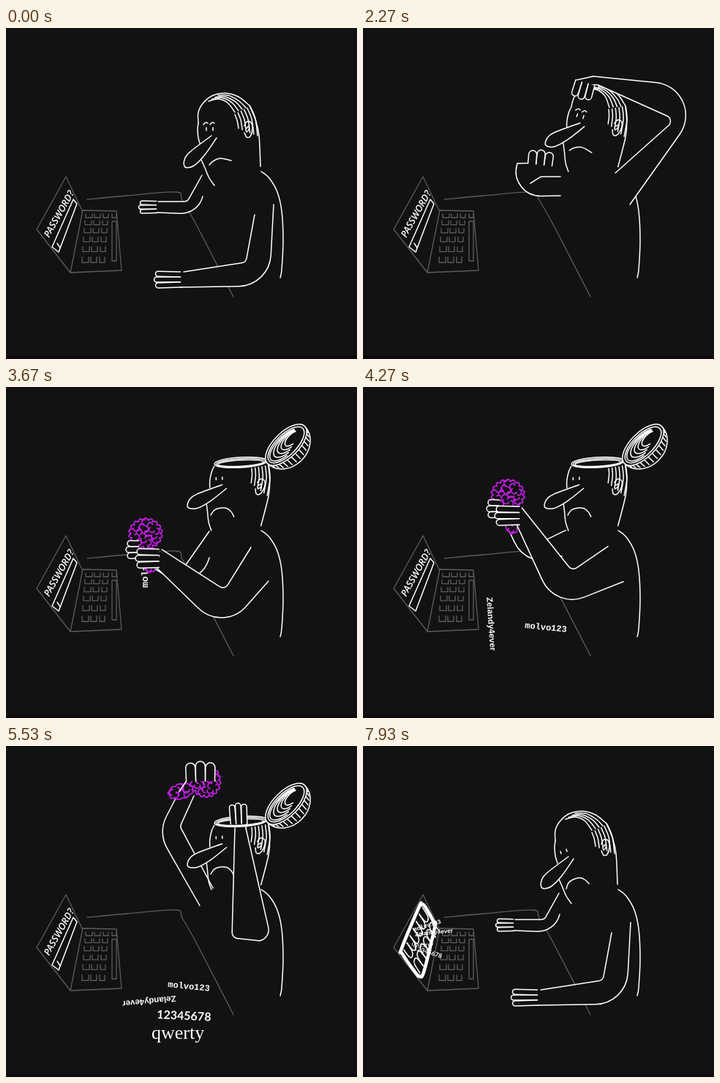
An HTML page with a canvas for the animation above (8000 ms loop, 480 px wide and 452 px high).

```html
<!DOCTYPE html>
<html lang="en">
<head>
<meta charset="utf-8">
<title>Password?</title>
<style>
  html, body { margin: 0; width: 100%; height: 100%; overflow: hidden; background: #121212; }
  canvas { display: block; }
</style>
</head>
<body>
<canvas id="stage" width="480" height="452"></canvas>
<script>
const ctx = document.getElementById('stage').getContext('2d');
const BG = '#121212', WHITE = '#fff', GREY = '#5c5c5c', PURPLE = '#c21fe3';
const LOOP = 8000, STEP = 1000 / 15, { PI, sin, cos, min, max } = Math;

const nums = s => s.match(/-?[\d.]+/g).map(Number);
const mix = (a, b, k) => a.map((v, i) => v + (b[i] - v) * k);
const linear = (t, from, to) => min(1, max(0, (t - from) / (to - from)));
const ramp = (t, from, to) => { const k = linear(t, from, to); return k * k * (3 - 2 * k); };
const noise = n => { const v = sin(n * 127.1 + 3.7) * 43758.5; return v - Math.floor(v); };

function group(paint) { ctx.save(); paint(); ctx.restore(); }

function pen(color = WHITE, width = 1.5) {
  ctx.strokeStyle = color;
  ctx.lineWidth = width;
  ctx.fillStyle = BG;
}

// Smooth curve through points given as text or a flat list.
function curve(points, fill = false) {
  const p = typeof points === 'string' ? nums(points) : points, n = p.length / 2;
  const at = i => { i = max(0, min(n - 1, i)); return [p[2 * i], p[2 * i + 1]]; };
  ctx.beginPath();
  ctx.moveTo(p[0], p[1]);
  for (let i = 0; i < n - 1; i++) {
    const [a, b, c, d] = [at(i - 1), at(i), at(i + 1), at(i + 2)];
    ctx.bezierCurveTo(b[0] + (c[0] - a[0]) / 6, b[1] + (c[1] - a[1]) / 6,
      c[0] - (d[0] - b[0]) / 6, c[1] - (d[1] - b[1]) / 6, c[0], c[1]);
  }
  if (fill) ctx.fill();
  ctx.stroke();
}

function lines(...p) {
  ctx.beginPath();
  for (let i = 0; i < p.length; i += 2) ctx.lineTo(p[i], p[i + 1]);
  ctx.stroke();
}

function ellipse(x, y, rx, ry, rot = 0, from = 0, to = 2 * PI, fill = false) {
  ctx.beginPath();
  ctx.ellipse(x, y, rx, ry, rot, from, to);
  if (fill) ctx.fill();
  ctx.stroke();
}

// Evenly spaced strands between a first and a last one.
function strands(first, last, count) {
  for (let i = 0; i < count; i++) curve(mix(nums(first), nums(last), i / (count - 1)));
}

// Arm pose: wrist, elbow, shoulder of both edges; then hand offset, angle, finger length, finger width.
const near = {
  table: '243,333 328,320 340,255  240,354 360,352 366,241  -3,0 3.14 34 7',
  scratch: '322,78 427,125 345,198  315,66 478,82 365,241  -15,3 1.85 21 9',
  low: '213,222 299,277 335,219  205,246 297,335 359,265  0,0 3.14 30 8.3',
  high: '219,143 281,241 335,217  212,165 250,290 355,266  0,-1 3.14 32 8.3',
  skull: '313,112 309,262 347,266  328,112 362,262 347,266  -2,-6 4.66 26 7.5',
  push: '158,251 230,255 326,220  155,270 260,285 338,259  0,0 3 36 7',
  sweep: '290,395 336,320 340,255  312,408 370,340 366,241  0,0 2.8 28 7'
};
const far = {
  table: '208,237 248,237 268,201  207,252 262,254 269,230  -2,0 3.14 22 5.3',
  scratch: '229,212 243,203 270,203  211,185 199,230 270,229  22,-12 4.83 18 11',
  low: '190,222 243,247 278,197  190,240 262,284 278,233  -9,-9 3.14 15 8',
  high: '203,150 226,207 277,195  197,165 212,240 270,230  -12,-13 3.14 15 8',
  skull: '257,68 238,110 283,194  237,62 208,118 265,218  19,-17 4.7 25 13',
  push: '152,243 215,251 272,210  152,252 230,258 280,236  0,0 3.1 26 5'
};

// Schedules are [time, pose]; the shaking alternates low and high.
const shake = [...Array(7)].map((_, i) => [3670 + 225 * i, i % 2 ? 'high' : 'low']);
const nearKeys = [[0, 'table'], [1470, 'table'], [1870, 'scratch'], [2950, 'scratch'], [3200, 'skull'], [3350, 'skull'],
  ...shake, [5450, 'skull'], [5700, 'skull'], [5900, 'scratch'], [6130, 'scratch'], [6400, 'sweep'],
  [6640, 'push'], [6930, 'push'], [7230, 'table'], [LOOP, 'table']];
const farKeys = [[0, 'table'], [1470, 'table'], [1800, 'scratch'], [3200, 'scratch'],
  ...shake, [5450, 'skull'], [5600, 'skull'], [6000, 'table'], [6300, 'table'],
  [6640, 'push'], [6930, 'push'], [7230, 'table'], [LOOP, 'table']];

function armAt(poses, keys, t) {
  const i = keys.findIndex(key => key[0] > t), [t0, a] = keys[i - 1], [t1, b] = keys[i];
  const v = mix(nums(poses[a]), nums(poses[b]), ramp(t, t0, t1));
  const [ox, oy, angle, length, width] = v.slice(12);
  return {
    inner: v.slice(0, 6), outer: v.slice(6, 12), ox, oy, angle, length, width,
    x: (v[0] + v[6]) / 2, y: (v[1] + v[7]) / 2
  };
}

// Two straight bones joined by a rounded elbow.
function limb([ax, ay, bx, by, cx, cy], radius, joined) {
  const [u, v] = [Math.atan2(ay - by, ax - bx), Math.atan2(cy - by, cx - bx)];
  const half = Math.acos(cos(u - v)) / 2;
  const reach = 0.95 * min(Math.hypot(ax - bx, ay - by), Math.hypot(cx - bx, cy - by));
  joined ? ctx.lineTo(ax, ay) : ctx.moveTo(ax, ay);
  ctx.arcTo(bx, by, cx, cy, min(radius, reach * Math.tan(half)));
  ctx.lineTo(cx, cy);
}

function drawArm({ inner, outer }) {
  const [ax, ay, bx, by, cx, cy] = outer;
  pen();
  ctx.beginPath(); limb(inner, 8); limb([cx, cy, bx, by, ax, ay], 45, true); ctx.fill();
  ctx.beginPath(); limb(inner, 8); limb(outer, 45); ctx.stroke();
}

// Three rounded fingers ordered from the inner to the outer edge.
function drawHand({ inner, outer, x, y, ox, oy, angle, length, width }, lift = () => 0) {
  const nx = sin(angle), ny = -cos(angle);
  const side = nx * (outer[0] - inner[0]) + ny * (outer[1] - inner[1]) < 0 ? -1 : 1;
  const r = width / 2, baseX = x + ox, baseY = y + oy, edge = 1.5 * width * side;
  pen();
  lines(outer[0], outer[1], baseX + nx * edge, baseY + ny * edge);
  for (let i = 0; i < 3; i++) group(() => {
    const across = (i - 1) * width * side, tip = length - r + (i === 1 ? 2 : 0);
    ctx.translate(baseX + nx * across, baseY + ny * across);
    ctx.rotate(angle + (1 - i) * side * 0.03 + lift(i));
    ctx.beginPath();
    ctx.moveTo(0, -r);
    ctx.arc(tip, 0, r, -PI / 2, PI / 2);
    ctx.lineTo(0, r);
    ctx.fill();
    ctx.stroke();
  });
}

function label(text, font, x, y, rot) {
  group(() => {
    ctx.translate(x, y);
    ctx.rotate(rot);
    ctx.font = font;
    ctx.fillStyle = WHITE;
    ctx.fillText(text, 0, 0);
  });
}

// Words drop out of the brain, come to rest, get swept up and are fed to the screen.
const words = [
  { text: 'molvo123', style: 'bold', family: '"Liberation Mono", monospace', born: 3670, from: 13, size: 12, rest: [221, 329, 0.1] },
  { text: 'Zelandy4ever', style: 'bold', family: '"Liberation Sans", sans-serif', born: 4120, from: 11.5, size: 11.5, rest: [232, 341, 3.04] },
  { text: 'qwerty', style: '', family: '"Liberation Serif", serif', born: 4578, from: 15, size: 26, rest: [199, 400, 0] },
  { text: '12345678', style: 'bold', family: 'Lato, sans-serif', born: 5020, from: 14, size: 16, rest: [206, 372, 0.05] }
];

function drawWords(t) {
  words.forEach(({ text, style, family, born, from, size, rest }, i) => {
    if (t < born - 70) return;
    const p = linear(t, born, born + 330), drop = p * p;
    let state = mix([194, 274, 0, from], [...rest, size], drop);
    state[0] -= 33 * sin(PI * p);
    state[2] = -PI / 2 + (rest[2] + PI / 2) * min(1, 1.5 * p);
    state = mix(state, [90, 264 + 4 * i, -0.32 + 0.05 * i, size], ramp(t, 6400, 6640));
    state = mix(state, [69, 254 + 8 * i, -0.3 + 0.2 * i, 7 + 0.1 * size], ramp(t, 6870, 7050));
    const chew = t > 7050 ? 3 * sin(t / 70 + i * 2) : 0;
    label(text, `${style} ${state[3]}px ${family}`, state[0] + chew, state[1] - chew, state[2]);
  });
}

function drawDesk() {
  pen(GREY, 1.3);
  curve('111,234 165,229 232,224 241,235 262,272 311,367');
  lines(104, 249, 82, 203, 42, 275, 88, 334, 105, 249, 151, 250, 158, 331, 88, 334);
  for (let row = 0; row < 6; row++) {
    const y = 254 + 8.5 * row + 0.65 * row * row, h = 5 + row * 0.5;
    for (let col = 0; col < (row ? 3 : 4); col++) {
      const x = 109 + col * 12 - row, w = 9 - col;
      lines(x, y, x, y + h, x + w, y + h, x + w, y);
    }
  }
  ctx.strokeRect(145, 264, 6, 54);
}

function drawPrompt(t) {
  label('PASSWORD?', 'italic 600 13px "Open Sans", sans-serif', 59, 287, -1.06);
  pen();
  lines(63, 299, 92, 234, 97, 240, 72, 306, 63, 299);
  const beat = t % 800;
  if (beat < 130 || beat >= 330) lines(70, 294, 74, 300);
}

function drawMouth(t) {
  const at = (u, v) => [54 + 27 * u + 24 * v, 279 - 62 * u + 34 * v];
  const depth = 0.39 - 0.07 * sin((t - 7000) / 75);
  pen(WHITE, 4.5);
  curve('79,217 84,218 97,241 98,248 83,309 77,314 73,311 54,284 53,276 77,219 79,217', true);
  pen();
  for (let i = 0; i < 6; i++) {
    for (const [gum, d] of [[0.04, depth], [0.96, -depth]]) {
      const u = k => 0.03 + (i + k) * 0.157;
      curve([[0, 0], [0.1, 0.8], [0.5, 1], [0.9, 0.8], [1, 0]].flatMap(([k, deep]) => at(u(k), gum + d * deep)));
    }
  }
}

// Scalloped outline filled with random curls.
function lobe(x, y, rx, ry, bumps, curls) {
  ctx.beginPath();
  for (let a = 0; a < 2 * PI; a += 0.03) {
    const r = 0.9 + 0.15 * Math.abs(sin(a * bumps / 2));
    ctx.lineTo(x + rx * r * cos(a), y + ry * r * sin(a));
  }
  ctx.closePath();
  ctx.fill();
  ctx.stroke();
  for (let i = 0; i < curls; i++) {
    const a = i * 2.4, r = 0.8 * Math.sqrt((i + 0.3) / curls), turn = noise(i) * 6;
    ellipse(x + rx * r * cos(a), y + ry * r * sin(a), 4, 3.2, turn, 0, 3.8);
  }
}

function drawBrain(hand, t) {
  const turn = hand.angle - PI, skull = [321, 98];
  const held = [hand.x + cos(turn * 0.6) + 31 * sin(turn * 0.6), hand.y + sin(turn * 0.6) - 31 * cos(turn * 0.6)];
  const out = ramp(t, 3250, 3500) - ramp(t, 5600, 5780);
  group(() => {
    ctx.translate(...mix(skull, held, out));
    ctx.rotate(turn * 0.85);
    pen(PURPLE, 1.8);
    lobe(6, 36, 10, 17, 9, 7);
    lobe(0, 0, 22, 20, 18, 17);
  });
}

// Top of the skull, swung open on its hinge at the back.
function drawCap(open) {
  group(() => {
    ctx.translate(357, 103);
    ctx.rotate((open - 1) * 1.9);
    ctx.translate(26, -24);
    ctx.rotate(-0.78);
    pen();
    ellipse(0, 0, 36, 30, 0, 0, PI, true);
    for (let a = 0.15; a < PI; a += 0.2) lines(36 * cos(a), 18 * sin(a), 35 * cos(a), 27 * sin(a));
    ellipse(0, 0, 36, 17, 0, 0, 2 * PI, true);
    ellipse(0, 0, 32, 14);
    for (let i = 0; i < 5; i++) ellipse(3 * i, 0, 29 - 4 * i, 12 - 1.5 * i, 0, 1.9, 5.6);
  });
}

function drawHead(t) {
  const tilt = ramp(t, 1470, 1750) - ramp(t, 6270, 6500);
  const open = ramp(t, 2870, 3100) - ramp(t, 5940, 6100);
  const glum = t > 2950;
  group(() => {
    ctx.translate(332 + 16 * tilt, 139 - 2 * tilt);
    ctx.rotate(0.297 * tilt);
    ctx.translate(-332, -139);
    pen();
    curve('263,130 262,138 263,150 266,160');
    curve('267,180 272,191 278,205 285,215');
    curve('333,106 341,125 346,147 348,189');
    strands('313,118 316,126 318,137', '334,107 341,124 344,147', 6);
    curve('326,134 329,128 335,129 337,138 334,148 329,149 326,143');
    curve('329,137 332,134 332,139 329,142');
    if (!open) {
      curve('263,130 263,115 270,102 283,92 300,89 318,94 333,106');
      strands('277,100 290,97 303,102 313,115', '290,92 304,92 319,100 328,109', 4);
      if (t > 6100 && t < 7700) curve('263,130 280,129 305,123 330,108');
    }
    group(() => {
      if (glum) ctx.translate(0, 4);
      curve('281,147 252,169 244,180 245,190 257,188 272,173 288,150', true);
    });
    if (glum) {
      lines(270, 144, 271, 147);
      lines(278, 141, 279, 144);
      curve('278,195 281,187 288,182 297,180 304,183 309,188');
    } else {
      for (const x of [274, 283]) {
        curve(`${x - 4},132 ${x - 1},129 ${x + 2},130`);
        if (t < 870 || t >= 1000) lines(x, 136, x, 140);
      }
      curve('278,187 283,182 293,178 308,181');
    }
  });
  if (open) {
    for (let i = 0; i < 3; i++) ellipse(321, 103 + i / 2, 36 - 2.5 * i, 7 - 1.4 * i, -0.06, 0, 2 * PI, !i);
    drawCap(open);
  }
}

function render(now) {
  const t = Math.floor((now % LOOP + 5) / STEP) * STEP % LOOP;
  ctx.fillStyle = BG;
  ctx.fillRect(0, 0, 480, 452);
  ctx.fillStyle = '#0e0a0e';
  ctx.fillRect(0, 448, 480, 4);
  ctx.lineCap = ctx.lineJoin = 'round';

  const nearArm = armAt(near, nearKeys, t), farArm = armAt(far, farKeys, t);
  if (t > 1870 && t < 2730) nearArm.ox += 2 * sin(t / 45);
  const drumming = t >= 470 && t < 1390;
  const drum = i => drumming ? 0.4 * max(0, sin((t - 470) / 80 - i)) : 0;

  drawDesk();
  t < 7000 ? drawPrompt(t) : drawMouth(t);
  drawArm(farArm);
  curve('349,196 360,205 371,224 377,250 379,290 377,330 375,341');
  drawWords(t);
  drawHead(t);
  if (t >= 3250 && t < 5780) drawBrain(farArm, t);
  drawHand(farArm);
  drawArm(nearArm);
  drawHand(nearArm, drum);
}

const start = performance.now();
function tick() {
  render(performance.now() - start);
  requestAnimationFrame(tick);
}
tick();
</script>
</body>
</html>
```
